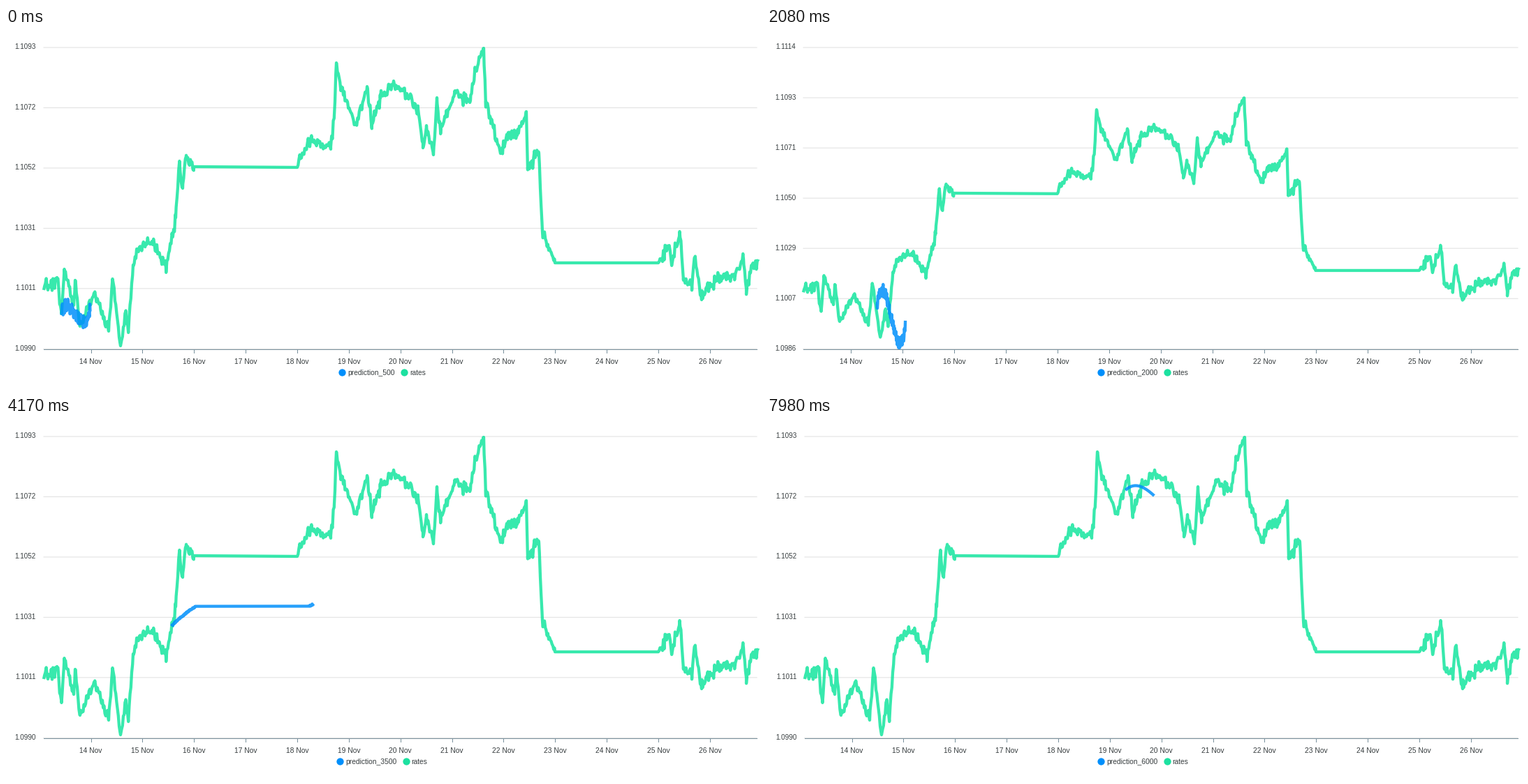
Write a matplotlib script that moves like this. It is 1081 px wide and 518 px high and loops after 8000 ms.

```python
import numpy as np
import matplotlib.pyplot as plt
from matplotlib.animation import FuncAnimation

W, H, DPI = 1081, 518, 100
LOOP, STEP = 8000, 20
PX = 72 / DPI
BLUE, GREEN, INK, AXIS = "#008FFB", "#00E396", "#373d3f", "#78909C"
CLOSE, WEEKEND = 269, 149.5  # x of the first weekend and its width

plt.rcParams["font.family"] = "Liberation Sans"

# Main turning points of the rate in each trading week; noise fills the rest
WEEKS = [
    [(54, 376), (73, 358), (79.5, 410), (83.5, 346), (97, 398), (99, 362),
     (106, 428), (127, 380), (147, 435), (152.5, 360), (164, 456), (171, 408),
     (175, 436), (182, 340), (187, 318), (209, 306), (229, 344), (243, 272),
     (248, 196), (253, 230), (258, 184), (269, 199)],
    [(417, 200), (433, 160), (465, 170), (470, 125), (473, 50), (480, 84),
     (490, 114), (501, 138), (517, 84), (524, 138), (536, 100), (554, 82),
     (574, 94), (590, 116), (597, 172), (602, 140), (612, 182), (617, 100),
     (622, 146), (643, 94), (665, 104), (672, 58), (684, 29), (687, 105),
     (694, 130), (708, 180), (719, 150), (732, 154), (745, 120), (747, 200),
     (763, 180), (768, 292), (786, 337)],
    [(934, 337), (949, 315), (953, 340), (964.5, 292), (970, 362), (982, 372),
     (986, 330), (996, 390), (1008, 366), (1042, 356), (1056, 332), (1060, 374),
     (1068, 340), (1077, 332)],
]

# Four heights that a cubic runs through, then the roughness
PREDICTIONS = [
    (409, 402, 420, 402, 10), (398, 382, 362, 354, 4), (402, 440, 388, 366, 6),
    (403, 386, 441, 428, 9), (336, 312, 283, 264, 3), (303, 308, 295, 293, 3),
    (300, 289, 278, 270, 1), (193, 132, 94, 92, 0), (155, 163, 182, 198, 0),
    (160, 163, 169, 175, 0), (108, 101, 98, 100, 0), (105, 98.5, 102.5, 113, 0),
]
STARTS = [460, 1150, 1750, 2540, 3230, 3970, 4690, 5520, 6310, 6970, 7620]
WIDE_INDEX = 3

NARROW = dict(left=54, first=121.5, pitch=73.87, label=43, low=1.0990, high=1.1093, rows=6)
WIDE = dict(left=52, first=120, pitch=74, label=41.5, low=1.0986, high=1.1114, rows=7)


def layout_for(index):
    return WIDE if index == WIDE_INDEX else NARROW


def rate_path():
    rng = np.random.default_rng(14)
    xs, ys = [], []
    for week in WEEKS:
        key_x, key_y = np.transpose(week)
        x = np.union1d(np.arange(key_x[0], key_x[-1], 1.2), key_x)
        noise = rng.normal(0, 4.5, x.size) * ~np.isin(x, key_x)
        xs.append(x)
        ys.append(np.interp(x, key_x, key_y) + noise)
    y = np.clip(np.concatenate(ys), 28, 459)
    return np.array([np.concatenate(xs) - NARROW["left"], y])


def prediction_path(index):
    *heights, rough = PREDICTIONS[index]
    rng = np.random.default_rng(index)
    u = np.linspace(0, 1, 90)
    x = 79.5 + 25.85 * index + 41 * u
    x = np.where(x > CLOSE, x + WEEKEND, x)
    y = np.polyval(np.polyfit(np.linspace(0, 1, 4), heights, 3), u)
    y = np.minimum(y + rng.uniform(-rough, rough, u.size), 459)
    return np.array([x - layout_for(index)["left"], y])


def back_out(t, s=1.70158):
    t = min(t, 1) - 1
    return 1 + t * t * ((s + 1) * t + s)


rates = rate_path()
rates_wide = np.array([rates[0] * 1023 / 1021, 99.5 + 0.804 * (rates[1] - 28)])
paths = [prediction_path(i) for i in range(len(PREDICTIONS))]

fig = plt.figure(figsize=(W / DPI, H / DPI), dpi=DPI, facecolor="white")
ax = fig.add_axes([0, 0, 1, 1])
ax.set(xlim=(0, W), ylim=(H, 0))
ax.axis("off")


def label(x, y, text, size=10.3, ha="left"):
    return ax.text(x, y, text, fontsize=size * PX, color=INK, ha=ha, va="baseline")


def rule(xs, ys, color, **style):
    return ax.plot(xs, ys, color=color, lw=PX, zorder=1, **style)


def build_axes(layout):
    parts = []
    span = [layout["left"], 1075]
    rows = layout["rows"]
    values = np.linspace(layout["high"], layout["low"], rows)
    for y, value in zip(np.linspace(28, 460.3, rows), values):
        parts += rule(span, [y, y], "#e0e0e0", snap=False)
        parts.append(label(layout["label"], y + 2.5, f"{value:.4f}", 9.9, "right"))
    parts += rule(span, [461, 461], AXIS)
    for i in range(13):
        x = layout["first"] + i * layout["pitch"]
        parts += rule([x, x], [461, 466], AXIS)
        parts.append(label(x, 481.5, f"{14 + i} Nov", ha="center"))
    return parts


axes_parts = [(layout, build_axes(layout)) for layout in (NARROW, WIDE)]
stroke = dict(lw=4.3 * PX, solid_capstyle="butt", solid_joinstyle="round")
rate_line, = ax.plot([], [], color=GREEN, alpha=0.78, zorder=3, **stroke)
blue_line, = ax.plot([], [], color=BLUE, alpha=0.85, zorder=4, **stroke)
dot = dict(ls="", marker="o", ms=10.3 * PX, mew=0)
blue_dot, = ax.plot([], [], color=BLUE, **dot)
green_dot, = ax.plot([], [], color="#1CE1A0", **dot)
blue_name = label(0, 497.7, "")
green_name = label(0, 497.7, "rates")


def update(frame):
    now = frame * STEP + STEP / 2
    index = sum(now >= start for start in STARTS)
    before, progress = max(index - 1, 0), 1
    if index:
        elapsed = (now - STARTS[index - 1]) // 40 * 40
        progress = back_out(elapsed / 300)

    layout = layout_for(index)
    for kind, parts in axes_parts:
        for part in parts:
            part.set_visible(kind is layout)

    def morph(line, old, new):
        x, y = old + (new - old) * progress
        line.set_data(x + layout["left"], y)

    morph(blue_line, paths[before], paths[index])
    morph(rate_line, *(rates_wide if i == WIDE_INDEX else rates for i in (before, index)))

    blue_x, green_x = (478.3, 572.5) if index else (481, 570)
    for x, marker, name in ((blue_x, blue_dot, blue_name), (green_x, green_dot, green_name)):
        marker.set_data([x], [494])
        name.set_x(x + 7.8)
    blue_name.set_text(f"prediction_{500 * (index + 1)}")
    return [rate_line, blue_line, blue_dot, green_dot, blue_name, green_name]


anim = FuncAnimation(fig, update, frames=LOOP // STEP, interval=STEP,
                     repeat=True, repeat_delay=0, blit=False)
plt.show()
```
